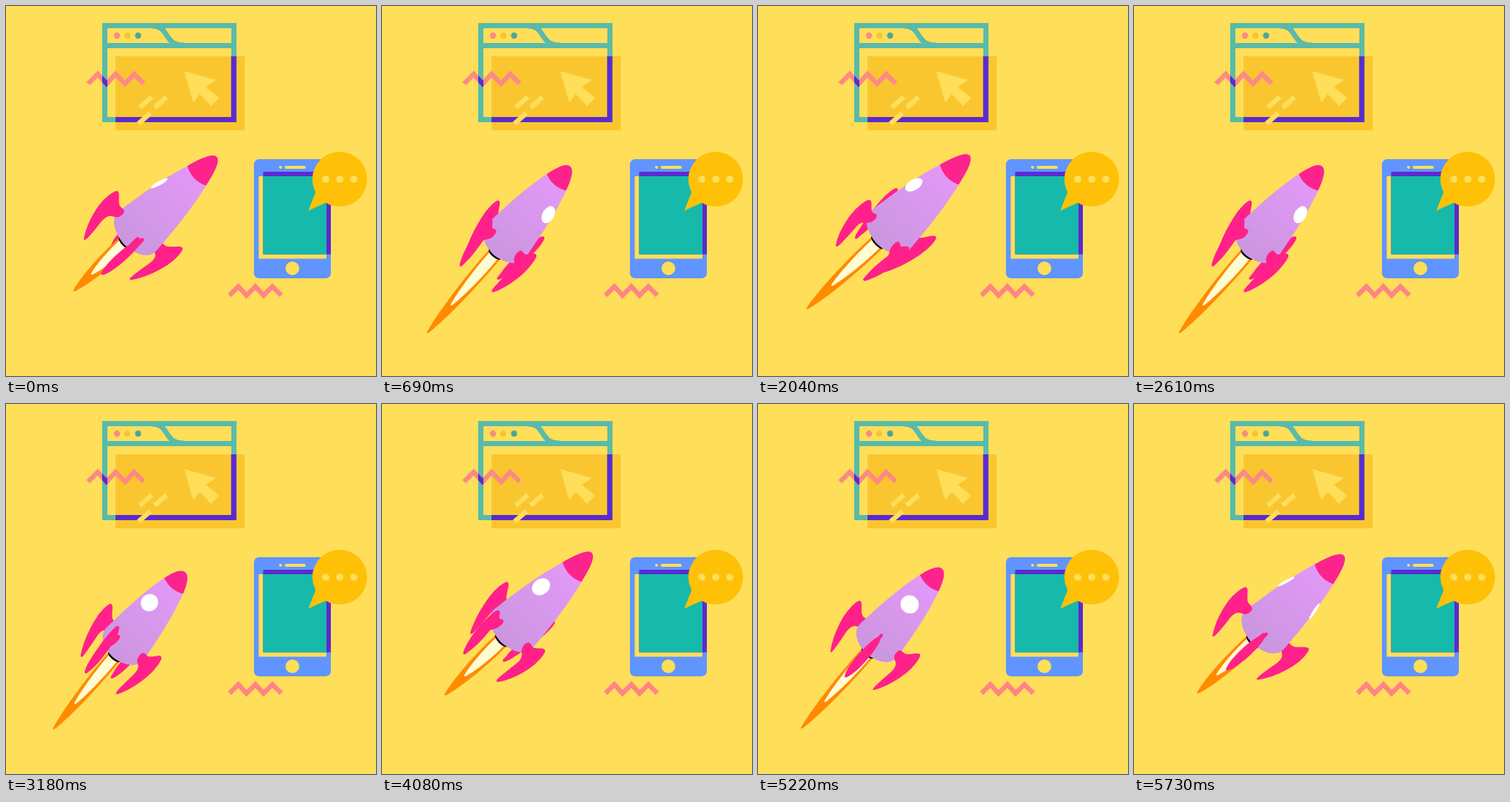
Write an HTML page with a canvas that moves like this. It is 500x500 px and loops after 5760 ms.

```html
<!DOCTYPE html>
<html lang="en">
<head>
<meta charset="utf-8">
<title>Rocket</title>
<style>
html, body { margin: 0; width: 100%; height: 100%; overflow: hidden; background: #ffde59; }
svg, canvas { position: absolute; left: 0; top: 0; width: 500px; height: 500px; }
</style>
</head>
<body>
<svg viewBox="0 0 500 500" fill="none">
  <!-- browser window -->
  <rect x="148" y="68" width="174.500" height="100" fill="#fac62f"/>
  <g stroke="#58bba9" stroke-width="7">
    <rect x="133.500" y="26.500" width="174.500" height="127"/>
    <path d="M134 53.500H308M197 27C222 27 212 53 240 53"/>
  </g>
  <path d="M307.800 68V153.500H148" stroke="#5a2bcf" stroke-width="7"/>
  <circle cx="150" cy="40" r="4.200" fill="#fc8a80"/>
  <circle cx="164" cy="40" r="4.200" fill="#f8c32c"/>
  <circle cx="178.500" cy="40" r="4.200" fill="#4ca596"/>
  <path d="M241 88L284 100L270 109L288 124L277 135L262 119L253 130Z" fill="#ffde59"/>
  <path d="M181 137L197 123M201 137L217 123M179 159L195 145" stroke="#ffde59" stroke-width="6.500"/>
  <clipPath id="edge"><rect x="130" y="80" width="7" height="40"/></clipPath>
  <g stroke-width="6.500">
    <path id="zig" d="M111 105L124 92L136 105L148 92L161 105L173 92L186 105" stroke="#fc8a84"/>
    <use href="#zig" clip-path="url(#edge)"/>
    <path d="M111 105L124 92L136 105L148 92" stroke="#5a2bcf" clip-path="url(#edge)"/>
    <path d="M302 391L314 379L325 391L337 379L348 391L360 379L372 391" stroke="#ff8585"/>
  </g>
  <!-- phone -->
  <rect x="335" y="207" width="104" height="161" rx="7" fill="#6095ff"/>
  <rect x="341.500" y="230" width="91.500" height="111.500" fill="#ffde59"/>
  <rect x="347.500" y="224" width="91.500" height="111.500" fill="#5a2bcf"/>
  <rect x="347.500" y="230" width="85.500" height="105.500" fill="#16b9aa"/>
  <g fill="#ffde59">
    <circle cx="371" cy="218" r="2"/>
    <rect x="376.500" y="216" width="28.500" height="4" rx="2"/>
    <circle cx="387" cy="354.500" r="9.300"/>
  </g>
  <path d="M419 250L408.500 276.500L434 265Z" fill="#ffc107"/>
  <circle cx="451" cy="234" r="37" fill="#ffc107"/>
  <g fill="#ffde59" stroke="#f0b410" stroke-width=".5">
    <circle cx="432" cy="234" r="5.300"/>
    <circle cx="451" cy="234" r="5.300"/>
    <circle cx="470" cy="234" r="5.300"/>
  </g>
</svg>
<canvas id="stage" width="500" height="500"></canvas>
<script>
const ctx = document.getElementById('stage').getContext('2d');
const RAD = Math.PI / 180, PINK = '#ff2189';
const { sin, cos, abs, exp, max, hypot, atan2 } = Math;

// Side view of a fin: distance from the nose tip, distance from the axis
const FIN = [[138, 32], [139, 43], [133, 50], [124, 58], [127, 62], [146, 64], [166, 60], [186, 53],
  [203, 43], [203, 41], [182, 43], [165, 46], [155, 43], [151, 32]];

// Closed curve through the midpoints of a polygon
function blob(points) {
  const n = points.length;
  ctx.beginPath();
  for (let i = 0; i <= n; i++) {
    const [ax, ay] = points[i % n], [bx, by] = points[(i + 1) % n];
    const mx = (ax + bx) / 2, my = (ay + by) / 2;
    if (i) ctx.quadraticCurveTo(ax, ay, mx, my); else ctx.moveTo(mx, my);
  }
  ctx.closePath();
}

function fillShape(color) {
  ctx.fillStyle = color;
  ctx.fill();
}

function tongue(start, half, length, color) {
  const end = start + length;
  ctx.beginPath();
  ctx.moveTo(start, -half);
  ctx.bezierCurveTo(start + length * .4, -half * 1.15, end - length * .15, -half * .6, end, -1);
  ctx.quadraticCurveTo(end + 1, 0, end, 1);
  ctx.bezierCurveTo(end - length * .15, half * .6, start + length * .4, half * 1.15, start, half);
  fillShape(color);
}

function drawRocket(p) {
  const a = (p - 3) * 7.5 * RAD, c = cos(a), s = sin(a);
  const far = (1 - c) / 2;
  const noseX = 262 + 24 * cos((p - 2.5) * 7.5 * RAD);
  const noseY = 214.7 - 14.4 * c + 1.7 * cos(2 * a) - s - 1.4 * sin(2 * a);
  const tilt = (47.2 - 3.9 * c + 1.2 * s) * RAD;
  const lean = .33 + .12 * c;
  const wide = 1 - .11 * far;
  const along = d => d - 24 * far * (1 - exp(-d / 40));   // foreshortened nose
  const spin = 7.5 * p - 77;

  // x runs from nose to tail, y across the body
  ctx.setTransform(-cos(tilt), sin(tilt), sin(tilt), cos(tilt), noseX, noseY);

  function fin(deg) {
    const side = sin(deg * RAD), front = cos(deg * RAD);
    const place = ([d, r]) => [along(d) + r * front * lean, r * side * wide];
    blob(FIN.map(place));
    fillShape(PINK);
    ctx.strokeStyle = PINK;
    ctx.lineJoin = 'round';
    ctx.lineWidth = 1 + 3 * abs(front);
    ctx.stroke();
    const [x1, y1] = place([130, 52]), [x2, y2] = place([204, 43]);
    ctx.beginPath();
    ctx.ellipse((x1 + x2) / 2, (y1 + y2) / 2, hypot(x2 - x1, y2 - y1) / 2, 6.8 * abs(front),
      atan2(y2 - y1, x2 - x1), 0, 7);
    fillShape(PINK);
  }

  function porthole(deg) {
    const side = sin(deg * RAD), front = cos(deg * RAD);
    if (front < -.14) return;
    ctx.beginPath();
    ctx.ellipse(along(82), 28 * side * wide, 13 - far, max(2, 12.5 * front),
      .25 * side, 0, 7);
    fillShape('#fff');
  }

  const fins = [0, 90, 180, 270].map(d => d + spin);
  const inFront = d => cos(d * RAD) >= 0;
  fins.filter(d => !inFront(d)).forEach(fin);

  const base = along(174);
  const flame = 127 + 21 * cos((p - 21) * 7.5 * RAD) - 16 * cos(p * 60 * RAD);
  tongue(base - 4, 10.5 * wide, flame + 4, '#ff8a00');
  tongue(base - 4, 7.5 * wide, flame * .64 + 4, '#fffbd2');
  ctx.beginPath();
  ctx.ellipse(base - 3, 0, 4.5, 11.5 * wide, 0, 0, 7);
  fillShape('#080008');

  const w = k => k * wide;
  ctx.beginPath();
  ctx.moveTo(0, 0);
  for (const dir of [-1, 1]) {
    const pts = [[0, 7], [along(15), 13], [along(38), 18.5],
      [along(75), 29], [along(118), 34], [along(148), 37],
      [along(164), 38], [along(172), 18], [along(173), 0]];
    if (dir > 0) pts.reverse();
    const start = dir > 0 ? [[along(172), 18], [along(164), 38], [along(148), 37],
      [along(118), 34], [along(75), 29], [along(38), 18.5],
      [along(15), 13], [0, 7], [0, 0]] : pts;
    for (let i = 0; i < 9; i += 3) {
      ctx.bezierCurveTo(...start.slice(i, i + 3).flatMap(([x, y]) => [x, dir * w(y)]));
    }
  }
  const shade = ctx.createLinearGradient(along(40), 0, base, 0);
  shade.addColorStop(0, '#e298f7');
  shade.addColorStop(1, '#ca96de');
  fillShape(shade);

  // pink tip
  ctx.save();
  ctx.clip();
  ctx.beginPath();
  ctx.moveTo(-5, -40);
  ctx.lineTo(along(37), -w(20));
  ctx.quadraticCurveTo(along(48), 0, along(37), w(20));
  ctx.lineTo(-5, 40);
  fillShape('#fc238c');
  ctx.restore();

  porthole(spin);
  porthole(spin + 180);
  fins.filter(inFront).sort((m, n) => cos(m * RAD) - cos(n * RAD)).forEach(fin);
}

function draw() {
  const t = performance.now() % 5760, rest = t % 120;
  const step = Math.floor(t / 120) * 3 + (rest >= 60) + (rest >= 90);
  ctx.setTransform(1, 0, 0, 1, 0, 0);
  ctx.clearRect(0, 0, 500, 500);
  drawRocket(step % 48);
  requestAnimationFrame(draw);
}
draw();
</script>
</body>
</html>
```
